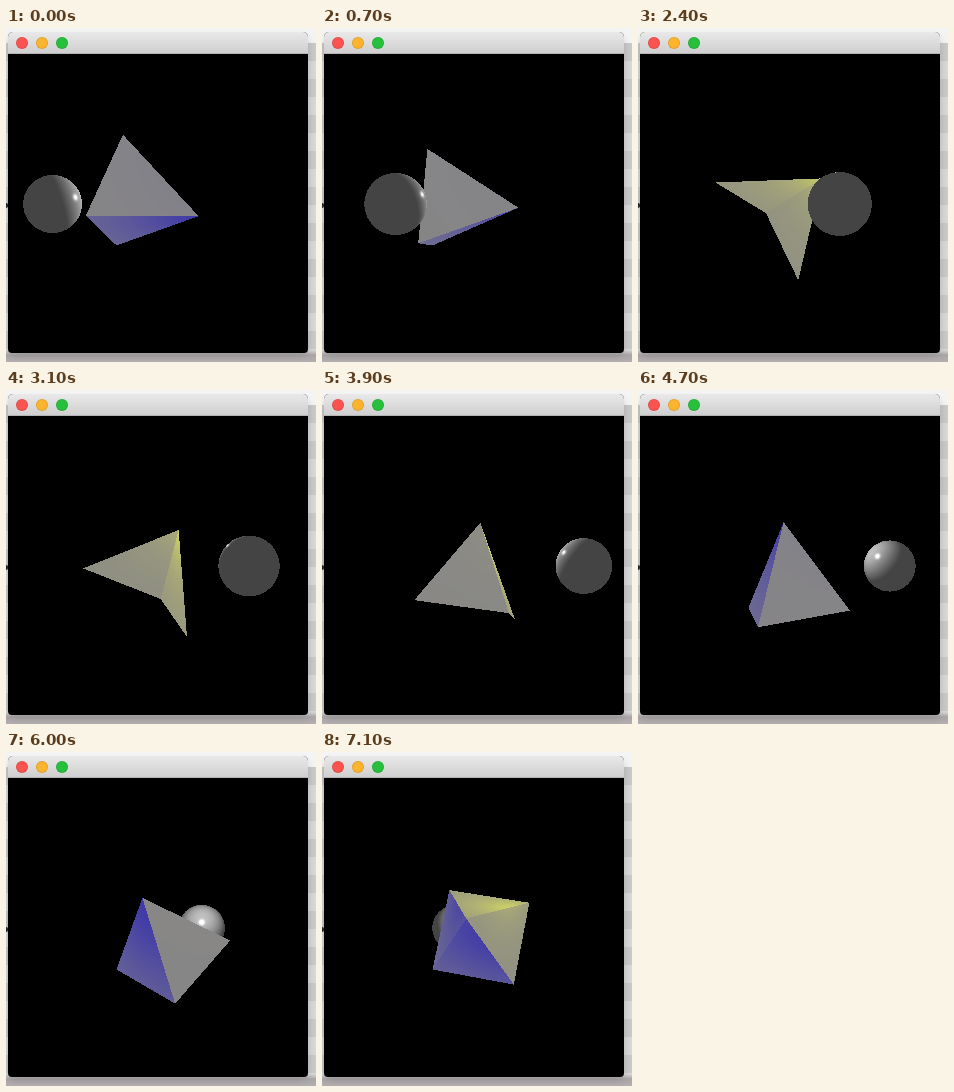
Write an HTML page with a canvas that moves like this. It is 310 px wide and 334 px high and loops after 7.2 s.

```html
<!DOCTYPE html>
<html lang="en">
<head>
<meta charset="utf-8">
<title>Pyramid and sphere</title>
<style>
  html, body { margin: 0; width: 100%; height: 100%; overflow: hidden; }
  body {
    position: relative;
    background: linear-gradient(#f4f4f4 0 15px, transparent 15px 322px, #aaa5a7 327px, #b4b0b2 334px),
      repeating-linear-gradient(#cacaca 0 18px, #d9d9d9 18px 36px) 0 15px;
  }
  .window {
    position: absolute; left: 2px; top: 4px; width: 300px; height: 321px;
    border-radius: 5px 5px 4px 4px; overflow: hidden; background: #000;
  }
  .shade {
    position: absolute; left: 2px; top: 8px; width: 300px; height: 317px;
    border-radius: 5px; box-shadow: 0 2px 8px rgba(0, 0, 0, .18);
  }
  .bar { height: 22px; background: linear-gradient(#e9e9e9, #cfcfcf); box-sizing: border-box; border-bottom: 1px solid #b4b4b4; }
  .bar i { position: absolute; top: 5px; width: 12px; height: 12px; border-radius: 50%; box-sizing: border-box; border: 1px solid rgba(0, 0, 0, .1); }
  .edge { position: absolute; left: 0; top: 175px; width: 2px; height: 5px; background: #222; border-radius: 0 2px 2px 0; }
  canvas { position: absolute; left: 0; top: 22px; }
</style>
</head>
<body>
<div class="shade"></div>
<div class="edge"></div>
<div class="window">
  <div class="bar">
    <i style="left:8px;background:#fb5450"></i>
    <i style="left:28px;background:#fcb42e"></i>
    <i style="left:48px;background:#27c03c"></i>
  </div>
  <canvas id="view" width="300" height="300"></canvas>
</div>
<script>
const STEP = 100, STEPS = 72;
const SIZE = 300, FOCAL = 614, EYE = 13.8;
const ORBIT = 2.43, RADIUS = 0.6;
const LIGHT = [1, 1, 0];
const COOL = [62, 56, 168], WARM = [208, 212, 100];

const ctx = document.getElementById('view').getContext('2d');
const image = ctx.createImageData(SIZE, SIZE);
const px = image.data;

const dot = (a, b) => a[0] * b[0] + a[1] * b[1] + a[2] * b[2];
const unit = v => { const l = Math.hypot(...v); return v.map(c => c / l); };

// Outward planes of the pyramid: four sides, then the open base.
const SIDE = 1 / Math.sqrt(5);
const PLANES = [[2, 1, 0], [-2, 1, 0], [0, 1, 2], [0, 1, -2], [0, -1, 0]]
  .map((n, i) => ({ n: unit(n), off: i < 4 ? SIDE : 1, open: i === 4 }));

// Rotation about the (1,1,1) diagonal.
function spin(angle) {
  const c = Math.cos(angle), s = Math.sin(angle) / Math.sqrt(3);
  const a = (1 + 2 * c) / 3, b = (1 - c) / 3 - s, d = (1 - c) / 3 + s;
  return ([x, y, z]) => [a * x + b * y + d * z, d * x + a * y + b * z, b * x + d * y + a * z];
}

// Nearest drawn side along the ray; back faces and the base stay invisible.
function hitPyramid(planes, dir) {
  let near = -Infinity, far = Infinity, face = null;
  for (const p of planes) {
    const slope = dot(p.n, dir), t = (p.off - EYE * p.n[2]) / slope;
    if (slope < 0) {
      if (t > near) { near = t; face = p; }
    } else if (t < far) far = t;
  }
  return near < far && !face.open ? { t: near, face } : null;
}

function hitSphere(ball, dir) {
  const to = [ball[0], ball[1], ball[2] - EYE];
  const a = dot(dir, dir), b = dot(to, dir);
  const q = b * b - a * (dot(to, to) - RADIUS * RADIUS);
  return q < 0 ? Infinity : (b - Math.sqrt(q)) / a;
}

function shadePyramid(n, point) {
  const l = unit(LIGHT.map((c, i) => c - point[i]));
  const k = (1 + dot(n, l)) / 2;
  return COOL.map((c, i) => c + (WARM[i] - c) * k);
}

function shadeSphere(ball, point) {
  const n = point.map((c, i) => (c - ball[i]) / RADIUS);
  const l = unit(LIGHT.map((c, i) => c - point[i]));
  const v = unit([-point[0], -point[1], EYE - point[2]]);
  const lit = Math.max(0, dot(n, l));
  const h = unit(l.map((c, i) => c + v[i]));
  const g = 68 + 125 * lit + (lit > 0 ? 150 * Math.pow(Math.max(0, dot(n, h)), 130) : 0);
  return [g, g, g];
}

function draw(step) {
  const angle = (206.2 + 3.6 * step) * Math.PI / 180;
  const turn = spin(angle);
  const planes = PLANES.map(p => ({ ...p, n: turn(p.n) }));
  const ball = [ORBIT * Math.cos(angle), 0, -ORBIT * Math.sin(angle)];
  px.fill(0);
  for (let y = 60; y < 240; y++) {
    for (let x = 0; x < SIZE; x++) {
      const dir = [(x + 0.5 - SIZE / 2) / FOCAL, (SIZE / 2 - y - 0.5) / FOCAL, -1];
      const solid = hitPyramid(planes, dir);
      const ts = hitSphere(ball, dir);
      if (!solid && ts === Infinity) continue;
      const front = solid && solid.t < ts;
      const t = front ? solid.t : ts;
      const point = [dir[0] * t, dir[1] * t, EYE - t];
      const rgb = front ? shadePyramid(solid.face.n, point) : shadeSphere(ball, point);
      const i = (y * SIZE + x) * 4;
      px[i] = rgb[0];
      px[i + 1] = rgb[1];
      px[i + 2] = rgb[2];
      px[i + 3] = 255;
    }
  }
  ctx.putImageData(image, 0, 0);
}

let shown = -1;
const start = performance.now();
function tick() {
  const step = Math.floor(Math.max(0, performance.now() - start) / STEP) % STEPS;
  if (step !== shown) draw(shown = step);
  requestAnimationFrame(tick);
}
tick();
</script>
</body>
</html>
```
